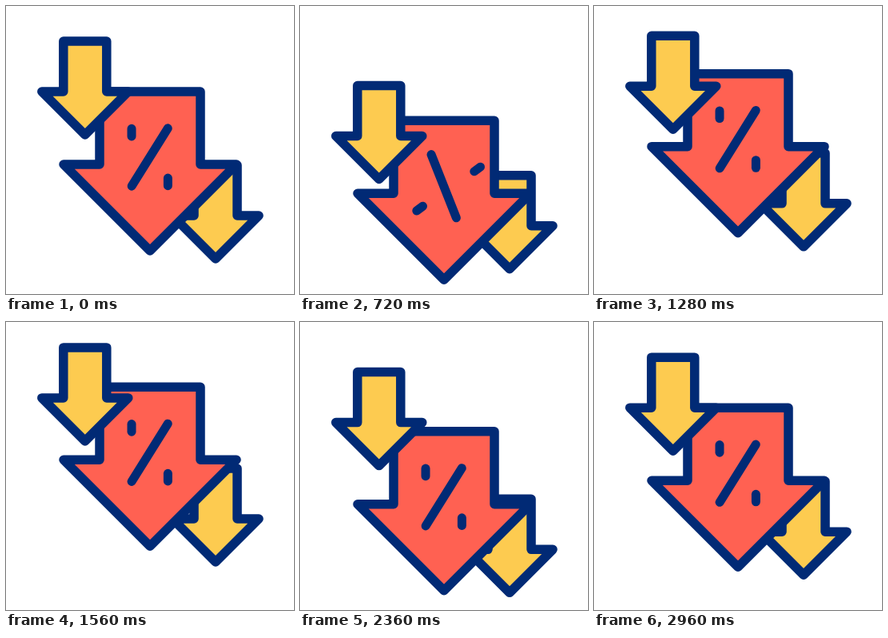
An HTML page with a canvas that plays this animation: 360x360 px, repeating every 3 s.

```html
<!DOCTYPE html>
<html lang="en">
<head>
<meta charset="utf-8">
<title>Falling percent arrows</title>
<style>
  html, body { margin: 0; width: 100%; height: 100%; overflow: hidden; background: #fff; }
  canvas { display: block; width: 100vmin; height: 100vmin; }
</style>
</head>
<body>
<canvas id="stage" width="360" height="360"></canvas>
<script>
const ctx = document.getElementById('stage').getContext('2d');
const LOOP = 3000, SPIN = 1205;
const NAVY = '#012a75', YELLOW = '#fdcb50', RED = '#ff6152';
const TIMES = [0, 680, 1440, 2230, LOOP];
const SPIN_TIMES = [0, 0.6, 0.867, 1];
const RAD = Math.PI / 180;

const ease = u => 0.5 - 0.5 * Math.cos(Math.PI * u);

// Eased value at x along keyed values
function track(x, keys, values) {
  let i = 0;
  while (i < keys.length - 2 && x >= keys[i + 1]) i++;
  const u = Math.min(1, (x - keys[i]) / (keys[i + 1] - keys[i]));
  return values[i] + (values[i + 1] - values[i]) * ease(u);
}

function arrow(x, top, shaft, wing, height, fill) {
  const y = top + height;
  ctx.beginPath();
  ctx.moveTo(x - shaft, top);
  ctx.lineTo(x + shaft, top);
  ctx.lineTo(x + shaft, y);
  ctx.lineTo(x + wing, y);
  ctx.lineTo(x, y + wing);
  ctx.lineTo(x - wing, y);
  ctx.lineTo(x - shaft, y);
  ctx.closePath();
  ctx.fillStyle = fill;
  ctx.fill();
  ctx.lineWidth = 11.5;
  ctx.stroke();
}

const smallArrow = (x, top) => arrow(x, top, 27, 54, 63, YELLOW);

// Bar centred on x, y; angle runs clockwise from upright
function bar(x, y, half, angle) {
  const dx = Math.sin(angle * RAD) * half, dy = -Math.cos(angle * RAD) * half;
  ctx.beginPath();
  ctx.moveTo(x - dx, y - dy);
  ctx.lineTo(x + dx, y + dy);
  ctx.stroke();
}

function dot(cx, cy, start, turn, u, lead, radius) {
  const a = (start - turn - track(u, SPIN_TIMES, lead)) * RAD;
  const r = track(u, SPIN_TIMES, radius);
  bar(cx + Math.sin(a) * r, cy - Math.cos(a) * r, 4.8, turn);
}

function percent(cx, cy, t) {
  const u = Math.min(1, t / SPIN);
  const turn = 360 * (ease(u) + u * u * (3 - 2 * u)) / 2;
  ctx.lineWidth = 11;
  bar(cx, cy, 42.6, 32 - turn);
  dot(cx, cy, -36.3, turn, u, [0, 27, -14, 0], [38.3, 47, 44, 38.3]);
  dot(cx, cy, 143.7, turn, u, [0, 43, -6, 0], [38.3, 41, 37, 38.3]);
}

function draw(t) {
  ctx.fillStyle = '#fff';
  ctx.fillRect(0, 0, 360, 360);
  ctx.strokeStyle = NAVY;
  ctx.lineJoin = ctx.lineCap = 'round';

  const left = track(t, TIMES, [44, 100, 30, 64, 44]);
  const big = track(t, TIMES, [107, 143.7, 77.8, 139, 107]);
  const right = track(t, TIMES, [199, 212, 180.6, 223, 199]);

  smallArrow(262, right);
  arrow(180, big, 63, 108, 91, RED);
  percent(179.7, big + 82, t);
  smallArrow(98.8, left);
}

function frame() {
  draw(performance.now() % LOOP);
  requestAnimationFrame(frame);
}
frame();
</script>
</body>
</html>
```
